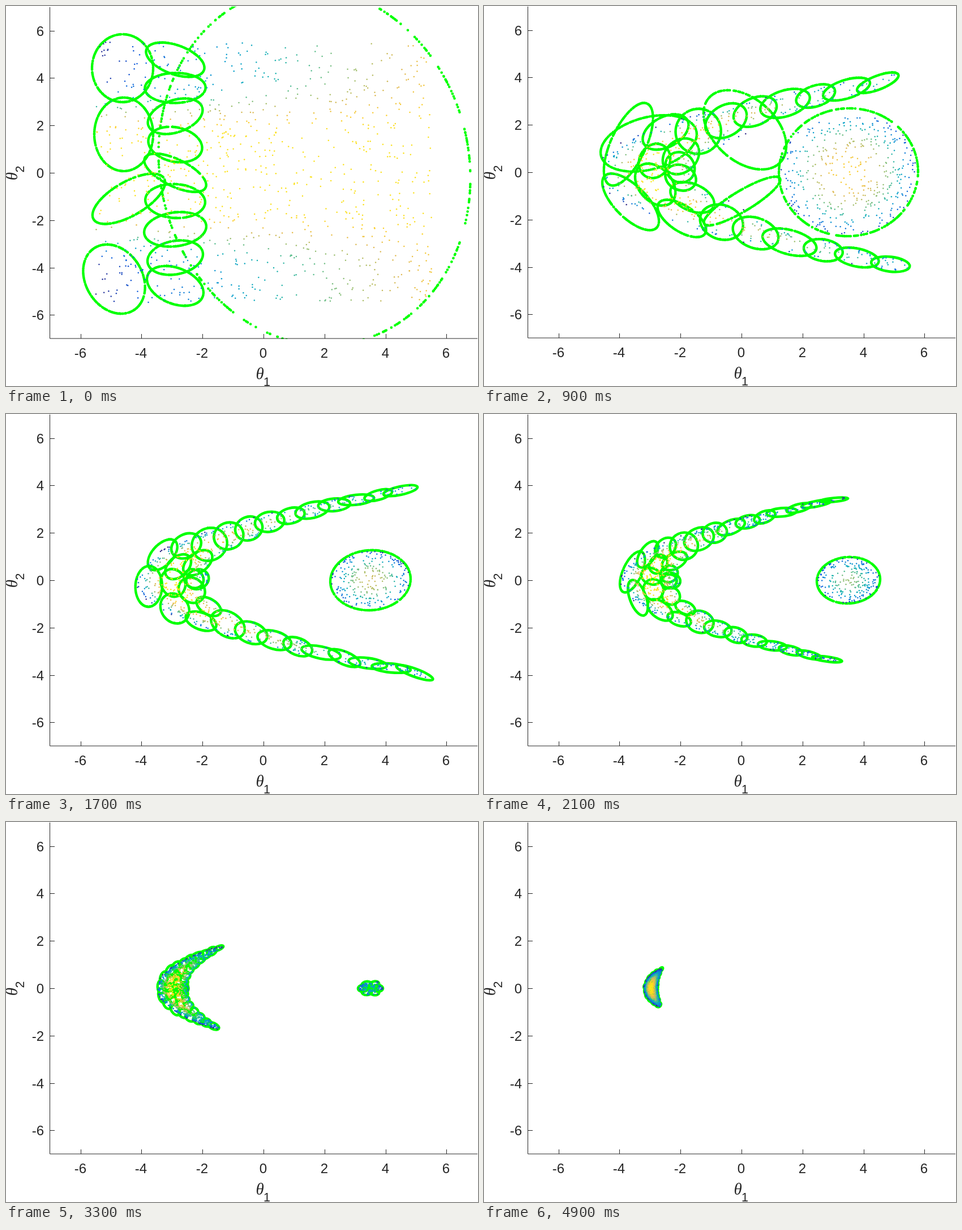
Recreate the animation shown at these times as an HTML page with a canvas. Size 834 by 672 pixels, loop 5400 ms.

```html
<!DOCTYPE html>
<html lang="en">
<head>
<meta charset="utf-8">
<title>Nested sampling ellipsoids</title>
<style>
html, body { margin: 0; width: 100%; height: 100%; overflow: hidden; background: #fff; }
canvas, svg { position: absolute; left: 0; top: 0; width: 834px; height: 672px; display: block; }
text { fill: #262626; font: 24px "Liberation Sans", Arial, sans-serif; }
.theta { font: italic 29px "Liberation Serif", serif; text-anchor: middle; }
.sub { font-size: 21.5px; text-anchor: middle; }
</style>
</head>
<body>
<canvas id="plot" width="834" height="672"></canvas>
<svg viewBox="0 0 834 672"><g id="axes"></g></svg>
<script>
const ctx = document.getElementById('plot').getContext('2d');
const axes = document.getElementById('axes');
const PARULA = [[53, 42, 135], [15, 92, 221], [18, 125, 216], [7, 156, 207], [21, 177, 180],
  [89, 189, 140], [165, 190, 107], [225, 185, 82], [252, 206, 46], [250, 236, 20]];
const CY = 294, MODE_X = 644, BEND = .016;
const LINE = 4.6;

function rng(seed) {
  return () => {
    seed = (seed + 0x6D2B79F5) | 0;
    let t = Math.imul(seed ^ (seed >>> 15), 1 | seed);
    t = (t + Math.imul(t ^ (t >>> 7), 61 | t)) ^ t;
    return ((t ^ (t >>> 14)) >>> 0) / 4294967296;
  };
}

const clamp = (v, lo, hi) => Math.max(lo, Math.min(hi, v));
const ridge = dy => 295 + BEND * dy * dy;
const ellipse = (x, y, rx, ry, deg = 0) => ({ x, y, rx, ry, a: deg * Math.PI / 180 });

// A loose grid of ellipses with varied sizes and tilts.
function grid(rnd, x, y, dx, dy, cols, rows, rx, ry, tilt = 30) {
  const vary = () => .85 + .3 * rnd();
  return Array.from({ length: cols * rows }, (_, i) => ellipse(
    x + dx * (i % cols), y + dy * Math.floor(i / cols),
    rx * vary(), ry * vary(), (2 * rnd() - 1) * tilt));
}

// Rows of overlapping ellipses across the ridge of the crescent.
function cover({ w, h, cell }, rnd) {
  const out = [];
  for (let dy = -h * .96; dy < h * .96;) {
    const lean = Math.atan(2 * BEND * dy), c = Math.cos(lean), n = Math.sin(lean);
    const half = w * Math.sqrt(1 - (dy / h) ** 2) * c;
    const count = Math.max(1, Math.round(half / cell));
    const len = cell * (1 + .5 * Math.abs(n));
    for (let j = 0; j < count; j++) {
      const u = ((j + .5) / count * 2 - 1) * half;
      const spread = clamp(1 - 2 * BEND * u * c ** 3, .7, 2);
      const x = ridge(dy) + u * c;
      if (x > 735) continue;
      out.push(ellipse(x, CY + dy - u * n, len * spread * (.85 + .4 * rnd()),
        Math.max(1.5, half / count * (.9 + .25 * rnd())),
        90 - lean * 180 / Math.PI + (rnd() - .5) * 24));
    }
    dy += 1.45 * len * c;
  }
  return out;
}

const roundMode = s => ellipse(MODE_X, CY, s.bx, s.by, -4);

function cluster(s, rnd) {
  return Array.from({ length: 6 }, (_, i) => {
    const a = i / 6 * Math.PI * 2;
    return ellipse(MODE_X + 13 * Math.cos(a), CY + 7 * Math.sin(a), 9, 6, 60 * rnd() - 30);
  });
}

function priorShapes(s, rnd) {
  return [
    ellipse(545, 283, 319, 273, 77),
    ellipse(206, 110, 54, 60), ellipse(208, 227, 52, 65),
    ellipse(217, 341, 72, 30, -30), ellipse(191, 483, 65, 50, 58),
    ...grid(rnd, 299, 95, 0, 50, 1, 9, 53, 28)];
}

function wideShapes(s, rnd) {
  return [
    ellipse(448, 216, 120, 105, 10), ellipse(588, 149, 75, 53, 5), ellipse(625, 426, 88, 66, -8),
    ellipse(355, 390, 83, 37, 28), ellipse(486, 417, 104, 33, 28), ellipse(318, 269, 74, 40, 8),
    ellipse(719, 445, 38, 73), ellipse(199, 325, 45, 61), ellipse(215, 237, 66, 40, -30),
    ...grid(rnd, 246, 318, 69, 7, 5, 1, 39, 32),
    ...grid(rnd, 580, 216, 66, 55, 3, 3, 37, 33),
    ...grid(rnd, 667, 129, 54, 40, 2, 2, 36, 26)];
}

const splitShapes = (s, rnd) => [
  ellipse(291, 243, 87, 46, -15), ellipse(461, 219, 85, 55, 42), ellipse(456, 345, 78, 18, -31),
  roundMode(s), ...cover(s, rnd)];

// w, h: half width and height of the crescent; bx, by: radii of the round mode;
// base: lowest energy in the round mode; cell: size of the covering ellipses.
const states = [
  { shapes: priorShapes },
  { w: 205, h: 260, bx: 230, by: 190, base: .05, shapes: wideShapes },
  { w: 98, h: 215, bx: 123, by: 113, base: .1, cell: 27, shapes: splitShapes },
  { w: 85, h: 208, bx: 93, by: 78, base: .15, cell: 23 },
  { w: 66, h: 195, bx: 71, by: 53, base: .25, cell: 19 },
  { w: 53, h: 148, bx: 56, by: 41, base: .35, cell: 15 },
  { w: 42, h: 118, bx: 41, by: 32, base: .42, cell: 12 },
  { w: 33, h: 93, bx: 30, by: 22, base: .5, cell: 9 },
  { w: 28, h: 74, bx: 22, by: 15, base: .6, cell: 6.5, mode: cluster },
  { w: 24, h: 64, bx: 12, by: 8, base: .8, cell: 6 },
  { w: 20, h: 53, cell: 5 },
  { w: 16, h: 43, cell: 4.5 },
  { w: 12.5, h: 34, cell: 4 }];

function shapesOf(s, rnd) {
  if (s.shapes) return s.shapes(s, rnd);
  const mode = s.mode ? s.mode(s, rnd) : s.bx ? [roundMode(s)] : [];
  return [...cover(s, rnd), ...mode];
}

// 0 at the peak of a mode, 1 on its border
function energy(s, x, y) {
  const dy = y - CY;
  if (!s.w) {
    const t = clamp((Math.abs(dy) - 62) / 110, 0, 1);
    return .04 + .95 * t * t * (3 - 2 * t) * (830 - x) / 670;
  }
  const arc = ((x - ridge(dy)) / s.w) ** 2 + (dy / s.h) ** 2;
  if (!s.bx) return arc;
  const round = ((x - MODE_X) / s.bx) ** 2 + (dy / s.by) ** 2;
  return Math.min(arc, s.base + (1 - s.base) * round);
}

function inside(q, x, y) {
  const c = Math.cos(q.a), n = Math.sin(q.a), dx = x - q.x, dy = y - q.y;
  return ((dx * c + dy * n) / q.rx) ** 2 + ((dy * c - dx * n) / q.ry) ** 2 < .95;
}

function color(v) {
  const p = clamp(v, 0, .999) * (PARULA.length - 1);
  const i = Math.floor(p);
  return `rgb(${PARULA[i].map((a, k) => Math.round(a + (PARULA[i + 1][k] - a) * (p - i)))})`;
}

function dot(x, y, r) {
  ctx.moveTo(x + r, y);
  ctx.arc(x, y, r, 0, 7);
}

// Outlines are made of randomly spaced dots, so the large ones look broken.
function outline(q, rnd) {
  ctx.beginPath();
  if (q.rx + q.ry < 50) {
    ctx.ellipse(q.x, q.y, q.rx, q.ry, q.a, 0, 7);
    ctx.stroke();
    return;
  }
  const c = Math.cos(q.a), n = Math.sin(q.a);
  for (let i = 0; i < 360; i++) {
    const t = rnd() * Math.PI * 2, u = q.rx * Math.cos(t), v = q.ry * Math.sin(t);
    dot(q.x + u * c - v * n, q.y + u * n + v * c, LINE / 2);
  }
  ctx.fill();
}

function samples(s, shapes, rnd) {
  const reach = Math.min(s.h || 230, 230);
  for (let i = 0, tries = 0; i < 950 && tries < 200000; tries++) {
    const x = 158 + rnd() * (s.w ? 615 : 594), y = CY + (2 * rnd() - 1) * reach;
    const e = energy(s, x, y);
    if (s.w && (e > 1.03 || !shapes.some(q => inside(q, x, y)))) continue;
    ctx.beginPath();
    ctx.fillStyle = color(1 - e);
    dot(x, y, 1.25);
    ctx.fill();
    i++;
  }
}

function draw(k) {
  const s = states[k], rnd = rng(97 + k * 31), shapes = shapesOf(s, rnd);
  const shift = k ? 0 : 1;
  ctx.clearRect(0, 0, 834, 672);
  ctx.save();
  ctx.beginPath();
  ctx.rect(78, 1, 756, 587 + shift);
  ctx.clip();
  ctx.fillStyle = ctx.strokeStyle = '#0f0';
  ctx.lineWidth = LINE;
  shapes.forEach(q => outline(q, rnd));
  samples(s, shapes, rnd);
  ctx.restore();
  axes.setAttribute('transform', `translate(0 ${shift})`);
}

function buildAxes() {
  let path = 'M77.5 1V587H833', text = '';
  for (let v = -6; v <= 6; v += 2) {
    const x = Math.round(455 + 53.9 * v), y = Math.round(294 - 41.9 * v);
    path += `M${x + .5} 587v-8M78 ${y + .5}h8`;
    text += `<text x="${x - .5}" y="621" text-anchor="middle">${v}</text>` +
      `<text x="67" y="${y + 9}" text-anchor="end">${v}</text>`;
  }
  const label = (place, i) => `<g transform="${place}"><text class="theta">θ</text>` +
    `<text class="sub" x="12.5" y="12">${i}</text></g>`;
  axes.innerHTML = `<path d="${path}" fill="none" stroke="#262626"/>` + text +
    label('translate(448.5 659)', 1) + label('translate(20 300) rotate(-90)', 2);
}

let shown = -1;
function update(ms) {
  const t = ms % 5400;
  const k = t < 500 ? 0 : Math.min(12, 1 + Math.floor((t - 500) / 400));
  if (k !== shown) draw(shown = k);
}

buildAxes();
const start = performance.now();
function tick() {
  update(performance.now() - start);
  requestAnimationFrame(tick);
}
tick();
</script>
</body>
</html>
```
